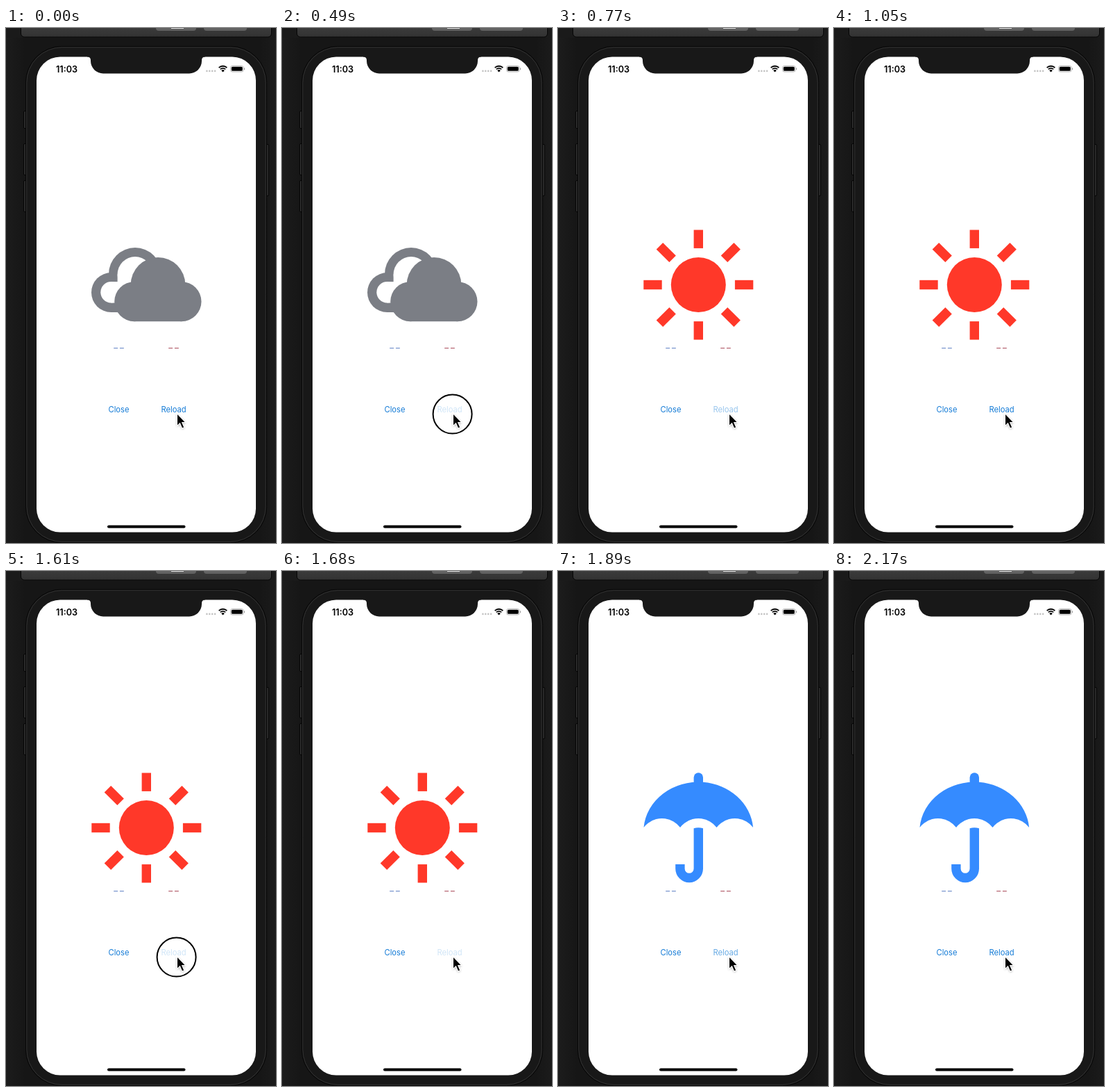
Animation of 389 by 741 pixels, one loop 2.73 s. Source, as an HTML page with a canvas:

```html
<!DOCTYPE html>
<html lang="en">
<head>
<meta charset="utf-8">
<title>Weather</title>
<style>
html, body { margin: 0; width: 100%; height: 100%; overflow: hidden; background: #1a1a1a; }
canvas { display: block; width: 389px; height: 741px; }
</style>
</head>
<body>
<canvas id="stage"></canvas>
<script>
const W = 389, H = 741, LOOP = 2730, STEP = 70;
// The ring shows from down to up; the new icon arrives at swap.
const PRESSES = [
  { down: 490, up: 630, swap: 630 },
  { down: 1610, up: 1680, swap: 1750 },
];
const FADE = 390;
const FONT = 'Inter, Roboto, "Liberation Sans", sans-serif';
const TAU = Math.PI * 2;

const canvas = document.getElementById('stage');
const ctx = canvas.getContext('2d');
const dpr = window.devicePixelRatio || 1;
canvas.width = W * dpr;
canvas.height = H * dpr;
ctx.scale(dpr, dpr);

function rect(x, y, w, h, color) {
  ctx.fillStyle = color;
  ctx.fillRect(x, y, w, h);
}

function round(x, y, w, h, r, fill, stroke, lw = 1) {
  ctx.beginPath();
  ctx.roundRect(x, y, w, h, r);
  if (fill) { ctx.fillStyle = fill; ctx.fill(); }
  if (stroke) { ctx.strokeStyle = stroke; ctx.lineWidth = lw; ctx.stroke(); }
}

function disc(x, y, r, color) {
  ctx.beginPath();
  ctx.arc(x, y, r, 0, TAU);
  ctx.fillStyle = color;
  ctx.fill();
}

function text(str, x, y, size, weight, color) {
  ctx.font = `${weight} ${size}px ${FONT}`;
  ctx.textAlign = 'center';
  ctx.fillStyle = color;
  ctx.fillText(str, x, y);
}

function drawDesk() {
  rect(0, 0, W, H, '#1a1a1a');
  const g = ctx.createLinearGradient(0, 0, W, 0);
  g.addColorStop(0, '#1c1c1c');
  g.addColorStop(0.07, '#161616');
  g.addColorStop(0.94, '#161616');
  g.addColorStop(1, '#1b1b1b');
  rect(0, 14, W, H, g);
  const bar = ctx.createLinearGradient(0, 0, 0, 13);
  bar.addColorStop(0, '#3b3b3b');
  bar.addColorStop(1, '#323232');
  round(21.5, -10, 361, 23, 5, bar, '#050505');
  round(216, -10, 58, 14, 4, '#626262');
  round(285, -10, 62, 14, 4, '#626262');
  rect(238, 0, 18, 1, '#e0e0e0');
}

function drawPhone() {
  const bezel = '#181818';
  for (const [x, y, h] of [[25.5, 119.5, 25], [25.5, 166.5, 45], [25.5, 219.5, 45], [373.5, 167.5, 74]]) {
    round(x, y, 5, h, 1.5, '#2a2a2a', '#060606');
  }
  round(28.5, 26.5, 347, 714, 52, bezel, '#050505');
  round(29.8, 27.8, 344.4, 711.4, 51, bezel, '#363636', 0.9);
  round(44, 41.5, 316, 684, 34, '#fff');

  ctx.beginPath();
  ctx.moveTo(117, 40);
  ctx.lineTo(117, 41.5);
  ctx.quadraticCurveTo(122, 41.5, 122, 46.5);
  ctx.arcTo(122, 65.4, 141, 65.4, 18);
  ctx.arcTo(282, 65.4, 282, 46.5, 18);
  ctx.lineTo(282, 46.5);
  ctx.quadraticCurveTo(282, 41.5, 287, 41.5);
  ctx.lineTo(287, 40);
  ctx.fillStyle = bezel;
  ctx.fill();
  round(146, 715.5, 112.5, 4, 2, '#000');
}

function drawStatus() {
  text('11:03', 87.5, 63.5, 12.6, 600, '#000');
  for (let i = 0; i < 4; i++) disc(289.4 + i * 3.9, 61.9, 1.3, '#c4c4c4');

  const a = Math.PI * 0.25;
  ctx.strokeStyle = '#000';
  ctx.lineWidth = 1.9;
  for (const r of [8.2, 5.1]) {
    ctx.beginPath();
    ctx.arc(312.5, 63, r, -Math.PI / 2 - a, -Math.PI / 2 + a);
    ctx.stroke();
  }
  ctx.beginPath();
  ctx.moveTo(312.5, 63.4);
  ctx.arc(312.5, 63.4, 3.2, -Math.PI / 2 - a, -Math.PI / 2 + a);
  ctx.fillStyle = '#000';
  ctx.fill();

  round(323.5, 54.5, 18.5, 8.6, 2.6, null, '#a6a6a6', 0.8);
  round(324.8, 55.8, 15.9, 6, 1.5, '#000');
  round(342.9, 57.3, 1.2, 3, 0.6, '#a6a6a6');
}

function drawCloud() {
  const gray = '#7b7e85';
  disc(186, 354, 38, gray);
  disc(151.5, 380.5, 28.5, gray);
  rect(151, 380, 40, 29, gray);
  disc(186, 354.5, 25.4, '#fff');
  rect(160.6, 354.5, 25, 12, '#fff');
  disc(151.5, 380.3, 15.2, '#fff');
  rect(151.5, 365.1, 38, 30.4, '#fff');
  disc(219, 369.3, 39.3, gray);
  disc(184.7, 393.7, 28.5, gray);
  disc(253, 393.7, 28.5, gray);
  rect(184.7, 366, 68.3, 56.2, gray);
}

function drawSun() {
  const red = '#ff3829';
  disc(202.3, 369.5, 39.5, red);
  ctx.save();
  ctx.translate(202.3, 369.5);
  for (let i = 0; i < 8; i++) {
    rect(-6.7, -79, 13.4, 26.4, red);
    ctx.rotate(TAU / 8);
  }
  ctx.restore();
}

function drawUmbrella() {
  const blue = '#358bff', cx = 202.3, base = 369;
  round(cx - 6.7, 290.3, 13.4, 20, 6.7, blue);

  const half = 78.8, cy = 375, ry = cy - 303.5;
  const tilt = Math.asin((cy - base) / ry);
  ctx.beginPath();
  ctx.ellipse(cx, cy, half / Math.cos(tilt), ry, 0, Math.PI + tilt, -tilt);
  const w = half * 2 / 3, r = 33, open = Math.asin(w / 2 / r);
  for (let i = 1; i >= -1; i--) {
    ctx.arc(cx + i * w, base + r * Math.cos(open), r, -Math.PI / 2 + open, -Math.PI / 2 - open, true);
  }
  ctx.fillStyle = blue;
  ctx.fill();

  ctx.beginPath();
  ctx.moveTo(cx - 6.7, 370.2);
  ctx.quadraticCurveTo(cx, 368.2, cx + 6.7, 370.2);
  ctx.lineTo(cx + 6.7, 428.3);
  ctx.arc(cx - 13.2, 428.3, 19.9, 0, Math.PI);
  ctx.lineTo(169.2, 422);
  ctx.lineTo(182.6, 422);
  ctx.lineTo(182.6, 428.3);
  ctx.arc(cx - 13.2, 428.3, 6.5, Math.PI, 0, true);
  ctx.closePath();
  ctx.fill();
}

function drawRing() {
  ctx.beginPath();
  ctx.arc(245.6, 555.6, 28, 0, TAU);
  ctx.strokeStyle = '#000';
  ctx.lineWidth = 2;
  ctx.stroke();
}

function drawCursor() {
  const points = [[0, 0], [0, 18.3], [4.1, 14.4], [7.2, 21.6], [10.5, 20.2], [7.4, 13.2], [12.6, 13.2]];
  ctx.save();
  ctx.translate(246.4, 554.5);
  ctx.beginPath();
  points.forEach(([x, y]) => ctx.lineTo(x, y));
  ctx.closePath();
  ctx.shadowColor = 'rgba(0,0,0,0.4)';
  ctx.shadowBlur = 3 * dpr;
  ctx.shadowOffsetY = dpr;
  ctx.fillStyle = '#000';
  ctx.fill();
  ctx.shadowColor = 'transparent';
  ctx.strokeStyle = '#fff';
  ctx.lineWidth = 1.2;
  ctx.stroke();
  ctx.restore();
}

function reloadAlpha(t) {
  const press = PRESSES.findLast(p => t >= p.down);
  if (!press) return 1;
  const k = Math.min(1, Math.max(0, (t - press.up) / FADE));
  return 0.2 + 0.8 * k * k * (3 - 2 * k);
}

function draw(time) {
  const t = Math.floor((time % LOOP) / STEP) * STEP;
  drawDesk();
  drawPhone();
  drawStatus();

  const icons = [drawCloud, drawSun, drawUmbrella];
  icons[PRESSES.filter(p => t >= p.swap).length]();

  text('--', 162.5, 467, 19.4, 300, '#7592cc');
  text('--', 241.5, 467, 19.4, 300, '#b5626f');
  text('Close', 162.5, 553.3, 11.2, 400, '#147bd6');
  ctx.globalAlpha = reloadAlpha(t);
  text('Reload', 241.5, 553.3, 11.2, 400, '#147bd6');
  ctx.globalAlpha = 1;

  if (PRESSES.some(p => t >= p.down && t < p.up)) drawRing();
  drawCursor();
}

const start = performance.now();
function tick() {
  draw(performance.now() - start);
  requestAnimationFrame(tick);
}
tick();
</script>
</body>
</html>
```
